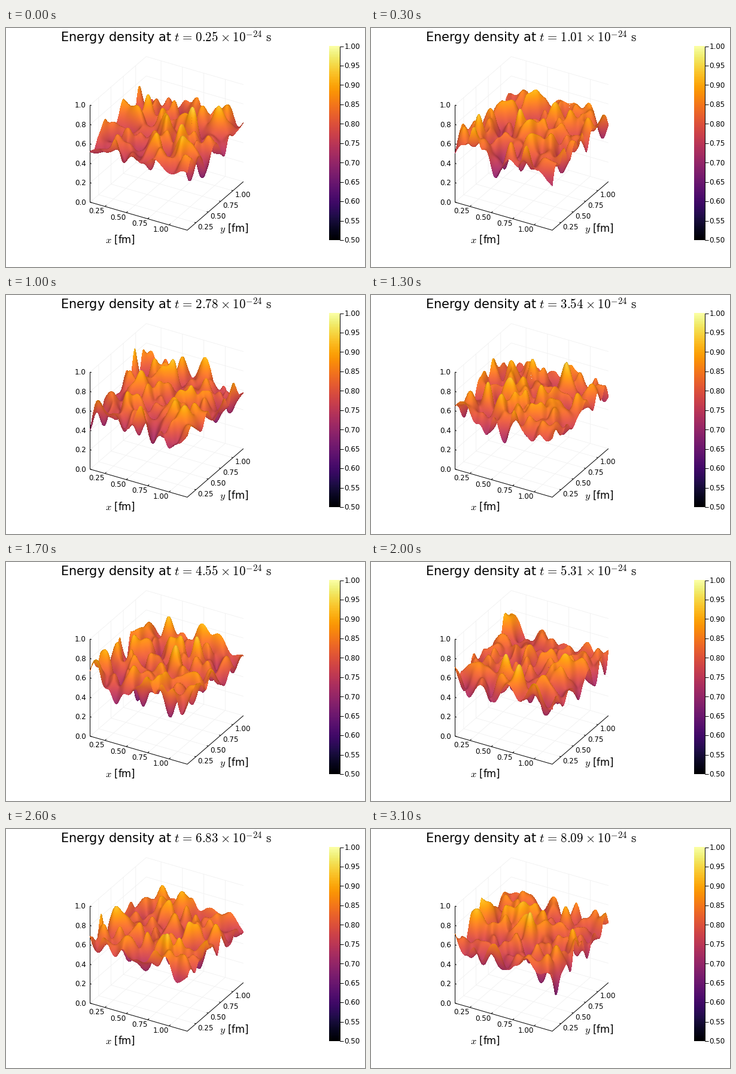
A matplotlib script for the animation above (3.2 s loop, 600 px wide and 400 px high).

```python
import numpy as np
import matplotlib as mpl
import matplotlib.pyplot as plt
from matplotlib.animation import FuncAnimation

mpl.rcParams["font.family"] = "DejaVu Sans"
mpl.rcParams["mathtext.fontset"] = "cm"

W, H, DPI = 600, 400, 100
FRAMES, SITES, SAMPLES = 32, 16, 900
STEP_T = 0.2529               # time per lattice step, 1e-24 s
SPACING = 0.0758              # lattice spacing, fm
MEAN, SPREAD = 0.605, 0.092   # energy density statistics
COUPLING = 0.08               # correlation of neighbouring sites

# Unit box seen orthographically, 30 degrees azimuth and elevation
EDGE, ANGLE = 187.6, np.radians(30)
SIN, COS = np.sin(ANGLE), np.cos(ANGLE)
ORIGIN = np.array([140.5, 291.5])
EX = EDGE * np.array([COS, SIN * SIN])
EY = EDGE * np.array([SIN, -COS * SIN])
EZ = EDGE * np.array([0, -COS])
VIEW = (COS * SIN, -COS * COS, SIN)


def project(x, y, z):
    return ORIGIN + x * EX + y * EY + z * EZ


def make_field():
    """Weakly correlated noise on a periodic lattice (step, x, y)."""
    rng = np.random.default_rng(5)
    f = rng.normal(size=(FRAMES, SITES, SITES))
    for axis in range(3):
        f = f + COUPLING * (np.roll(f, 1, axis) + np.roll(f, -1, axis))
    return np.clip(MEAN + SPREAD * f / f.std(), 0.34, 0.84)


def spline_matrix(n, m):
    """Matrix taking n node values to m samples of a natural cubic spline."""
    lhs, rhs, eye = np.eye(n), np.zeros((n, n)), np.eye(n)
    for i in range(1, n - 1):
        lhs[i, i - 1:i + 2] = 1, 4, 1
        rhs[i, i - 1:i + 2] = 6, -12, 6
    curv = np.linalg.solve(lhs, rhs)
    u = np.linspace(0, n - 1, m)
    k = np.minimum(u.astype(int), n - 2)
    b = (u - k)[:, None]
    a = 1 - b
    return (a * eye[k] + b * eye[k + 1]
            + ((a**3 - a) * curv[k] + (b**3 - b) * curv[k + 1]) / 6)


FIELD = make_field()
BASIS = spline_matrix(SITES, SAMPLES)
CMAP = plt.get_cmap("inferno")

# Samples run back to front: x rising, y falling
s = np.linspace(0, 1, SAMPLES)
gx, gy = s[:, None], s[None, ::-1]
base_px = (ORIGIN[0] + gx * EX[0] + gy * EY[0]).astype(int)
base_py = ORIGIN[1] + gx * EX[1] + gy * EY[1]
ORDER = np.arange(SAMPLES**2)


def render(step):
    z = BASIS @ FIELD[step] @ BASIS[::-1].T
    py = np.clip(base_py + z * EZ[1], 0, H - 1).astype(int)
    hit = np.full(W * H, -1)
    hit[(py * W + base_px).ravel()] = ORDER
    seen = np.flatnonzero(hit >= 0)
    idx = hit[seen]

    zx, zy = np.gradient(z, s[1])
    zx, zy = zx.ravel()[idx], -zy.ravel()[idx]
    facing = np.abs(-zx * VIEW[0] - zy * VIEW[1] + VIEW[2])
    facing = (facing / np.sqrt(zx**2 + zy**2 + 1))[:, None]

    image = np.zeros((W * H, 4))
    image[seen] = CMAP(z.ravel()[idx])
    lit = image[seen, :3] * (0.78 + 0.22 * facing) + 0.06 * facing
    image[seen, :3] = np.clip(lit, 0, 1)
    return image.reshape(H, W, 4)


fig = plt.figure(figsize=(W / DPI, H / DPI), dpi=DPI, facecolor="white")
ax = fig.add_axes([0, 0, 1, 1])
ax.axis("off")


def line(points, color="black", width=1.0, z=2):
    xs, ys = zip(*points)
    ax.plot(xs, ys, color=color, lw=width * 72 / DPI, zorder=z,
            solid_capstyle="butt")


def label(x, y, text, px=11.85, ha="center"):
    return ax.text(x, y, text, fontsize=px * 72 / DPI, ha=ha,
                   va="baseline", zorder=5)


def grid(*corners):
    line([project(*c) for c in corners], "#f0f0f0", 0.8, 1)


def draw_box():
    for v in (0.25, 0.5, 0.75, 1.0):
        f = (v - SPACING) / (SPACING * (SITES - 1))
        grid((f, 0, 0), (f, 1, 0), (f, 1, 1))
        grid((1, f, 0), (0, f, 0), (0, f, 1))

        p = project(f, 0, 0)
        line([p, p + EY * 0.025])
        label(p[0] - 0.4, p[1] + 11.8, f"{v:.2f}", ha="right")
        p = project(1, f, 0)
        line([p, p - EX * 0.015])
        label(p[0] + 3.2, p[1] + 10.7, f"{v:.2f}", ha="left")

    for v in np.arange(6) / 5:
        grid((0, 0, v), (0, 1, v), (1, 1, v))
        p = project(0, 0, v)
        line([p, p + EX * 0.015])
        label(134, p[1] + 4.3, f"{v:.1f}", ha="right")

    line([project(0, 0, 1), project(0, 0, 0), project(1, 0, 0),
          project(1, 1, 0)])
    label(190.8, 360, "$x$ [fm]", 16.5)
    label(381, 341.5, "$y$ [fm]", 16.5)


def draw_colorbar():
    top, bottom = 30.5, 355.0
    ax.imshow(np.linspace(1, 0, 256)[:, None], cmap=CMAP, aspect="auto",
              extent=(540, 558, bottom, top), interpolation="nearest")
    line([(557.5, top), (557.5, bottom)])
    for v in np.linspace(0, 1, 11):
        y = bottom + v * (top - bottom)
        line([(558, y), (563.5, y)])
        label(565.2, y + 4.3, f"{0.5 + v / 2:.2f}", ha="left")


draw_box()
draw_colorbar()
title = label(267, 24, "", 20.9)
surface = ax.imshow(np.zeros((H, W, 4)), extent=(0, W, H, 0), aspect="auto",
                    interpolation="nearest", zorder=3)
ax.set_xlim(0, W)
ax.set_ylim(H, 0)


def update(step):
    t = STEP_T * (step + 1)
    title.set_text(
        r"Energy density at $t\hspace{0.1}=\hspace{0.1}"
        rf"{t:.2f}\hspace{{0.04}}\times\hspace{{0.04}}10^{{-24}}"
        r"\ \mathrm{s}$")
    surface.set_data(render(step))
    return title, surface


anim = FuncAnimation(fig, update, frames=FRAMES, interval=100,
                     repeat=True, repeat_delay=0, blit=False)
plt.show()
```
